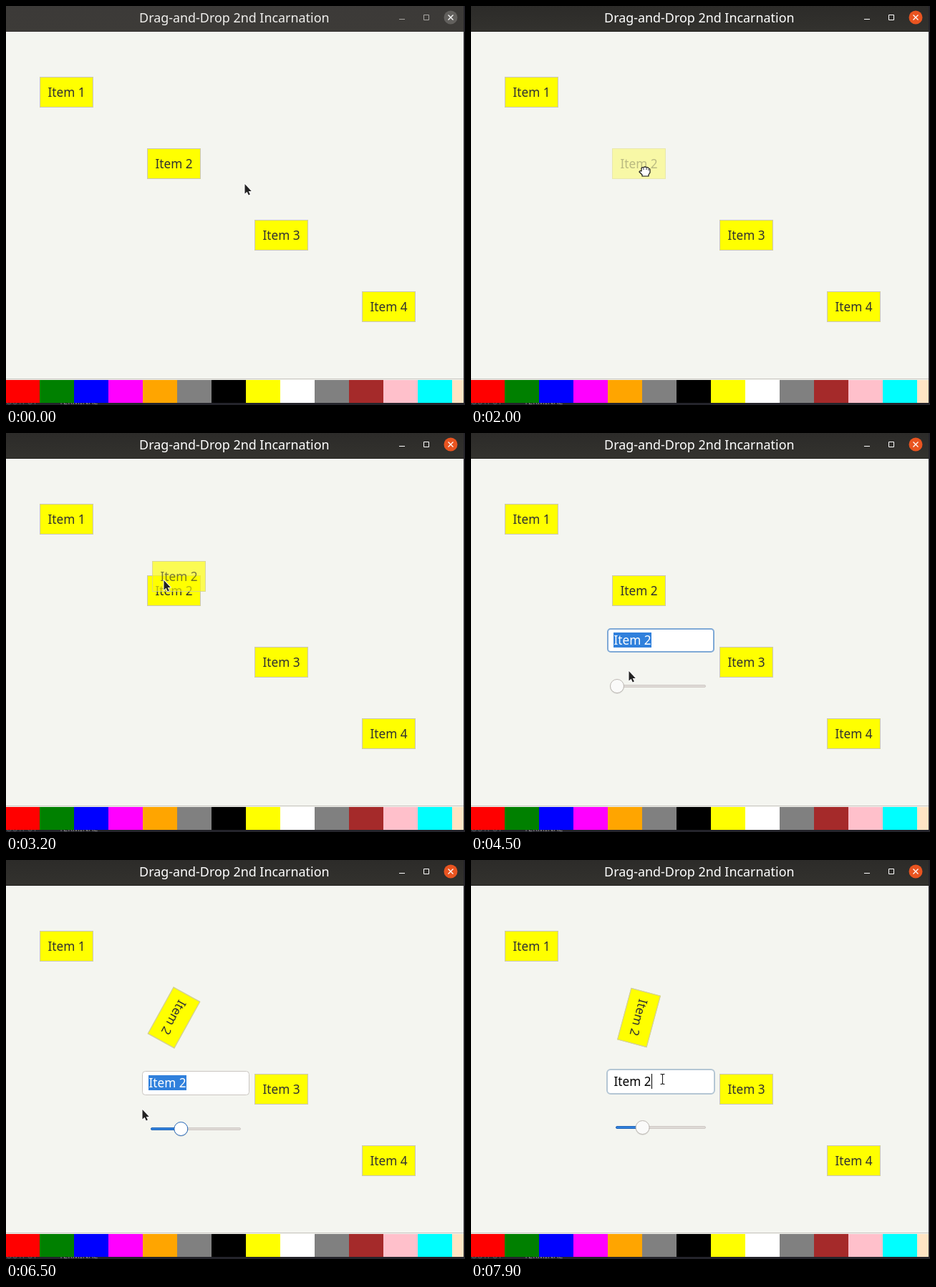
An HTML page with a canvas that plays this animation: 641x558 px, repeating every 8 s.

```html
<!DOCTYPE html>
<html lang="en">
<head>
<meta charset="utf-8">
<title>Drag and drop</title>
<style>
html, body { margin: 0; width: 641px; height: 558px; overflow: hidden; }
canvas { display: block; }
</style>
</head>
<body>
<canvas width="641" height="558"></canvas>
<script>
const g = document.querySelector('canvas').getContext('2d');
const FONT = '"Noto Sans", "Open Sans", sans-serif';
const LOOP = 8000, STEP = 100;
const ITEM_W = 75, ITEM_H = 43;
const HOME = { x: 197, y: 199 };
const SLIDER = { min: 203.7, length: 122, press: 5200, release: 7500 };
const GRAB = 2000, DROP = 3100, LANDED = 3700, EDIT = 4000, CLICK = 7900;
const BORDER = '#c8c4bc', BLUE = '#3080dc', DARK_BLUE = '#2467b8';
const SWATCHES = ['red', 'green', 'blue', 'magenta', 'orange', 'gray', 'black',
  'yellow', 'white', 'gray', 'brown', 'pink', 'cyan', 'bisque'];

// Turning points of the pointer: [time, x, y]
const PATH = [
  [200, 333, 248], [700, 288, 247], [1200, 262, 233], [1700, 240, 228], [GRAB, 240, 228],
  [2900, 232, 173], [3200, 220, 205], [4200, 226, 218], [4500, 220, 332], [5100, 205, 353],
  [5600, 248, 350], [5700, 249, 350], [5800, 332, 351], [6000, 203, 353], [6200, 172, 349],
  [6400, 172, 349], [6500, 190, 348], [6700, 298, 350], [6800, 280, 350], [7000, 280, 350],
  [7200, 346, 349], [7500, 239.3, 350], [7800, 267, 306]];

const mix = (a, b, u) => a + (b - a) * u;
const clamp = (v, lo, hi) => Math.min(hi, Math.max(lo, v));

function pointerAt(t) {
  const i = clamp(PATH.findIndex(p => p[0] > t), -1, PATH.length);
  if (i <= 0) return (i ? PATH[PATH.length - 1] : PATH[0]).slice(1);
  const [t0, x0, y0] = PATH[i - 1], [t1, x1, y1] = PATH[i];
  const u = (t - t0) / (t1 - t0);
  return [mix(x0, x1, u), mix(y0, y1, u)];
}

// The drawn pointer trails the slider it drags by one step
function angleAt(t) {
  if (t < SLIDER.press) return 0;
  const [x] = pointerAt(Math.min(t + STEP, SLIDER.release));
  return clamp((x - SLIDER.min) / SLIDER.length, 0, 1) * 360;
}

function rect(color, x, y, w, h) {
  g.fillStyle = color;
  g.fillRect(x, y, w, h);
}

function text(str, x, y, color, size = 17.2, align = 'left') {
  g.font = `${size}px ${FONT}`;
  g.textAlign = align;
  g.fillStyle = color;
  g.fillText(str, x, y);
}

function circle(x, y, r, fill, stroke) {
  g.beginPath();
  g.arc(x, y, r, 0, 7);
  g.fillStyle = fill;
  g.fill();
  if (stroke) { g.strokeStyle = stroke; g.stroke(); }
}

function box(x, y, w, h, r, fill, stroke) {
  g.beginPath();
  g.roundRect(x, y, w, h, r);
  g.fillStyle = fill;
  g.fill();
  g.strokeStyle = stroke;
  g.stroke();
}

function trace(path, color, width) {
  g.lineJoin = 'round';
  g.lineWidth = width;
  g.strokeStyle = color;
  g.stroke(path);
  g.lineWidth = 1;
}

function windowFrame(active) {
  rect('#f4f5f0', 0, 0, 641, 558);
  const bar = g.createLinearGradient(0, 0, 0, 35);
  bar.addColorStop(0, active ? '#2c2b29' : '#3c3a38');
  bar.addColorStop(1, active ? '#33322e' : '#3d3b38');
  rect(bar, 0, 0, 641, 35);
  rect(active ? '#1f1e1b' : '#343230', 0, 35, 641, 1);
  text('Drag-and-Drop 2nd Incarnation', 318.8, 23, active ? '#fff' : '#f0efed', 17.9, 'center');

  const ink = active ? '#fff' : '#a9a7a3';
  rect(ink, 549, 18, 8, 1);
  g.strokeStyle = ink;
  g.strokeRect(583.5, 12.5, 7, 7);
  circle(621, 16, 9.5, active ? '#e95420' : '#62605d');
  trace(new Path2D('M617.5 12.5l7 7m0-7l-7 7'), '#fff', 1.3);

  rect('#c9c6c1', 0, 521, 639, 1);
  SWATCHES.forEach((c, i) => rect(c, i * 48 - 1, 523, 48, 32));
  rect('#24242b', 0, 555, 641, 3);
  rect('#25242a', 639, 0, 2, 558);
  g.save();
  g.beginPath();
  g.rect(0, 555, 140, 3);
  g.clip();
  text('OUTPUT', 0, 556.5, '#606066', 11);
  text('TERMINAL', 74, 556.5, '#88888c', 11);
  g.restore();
}

function item(n, x, y, alpha = 1, angle = 0) {
  g.save();
  g.globalAlpha = alpha;
  g.translate(x + ITEM_W / 2, y + ITEM_H / 2);
  g.rotate(angle * Math.PI / 180);
  g.translate(-ITEM_W / 2, -ITEM_H / 2);
  rect('#ff0', 0, 0, ITEM_W, ITEM_H);
  g.strokeStyle = BORDER;
  g.strokeRect(0.5, 0.5, ITEM_W - 1, ITEM_H - 1);
  text('Item ' + n, 11.4, 28, '#2f3032');
  g.restore();
}

function movingItem(t, px, py) {
  if (t >= GRAB && t < DROP) {
    item(2, px - 43, py - 29, 0.31);
    return;
  }
  item(2, HOME.x, HOME.y, 1, angleAt(t));
  if (t >= DROP && t < LANDED) {
    const u = (t - DROP) / (LANDED - DROP);
    item(2, Math.round(mix(205.4, HOME.x, u)), Math.round(mix(175, HOME.y, u)), 0.78 * (1 - u));
  }
}

// Entry and slider hang below the rotated item's bounding box
function editor(t) {
  const angle = angleAt(t), a = angle * Math.PI / 180;
  const half = (ITEM_W * Math.abs(Math.sin(a)) + ITEM_H * Math.abs(Math.cos(a))) / 2;
  const top = Math.round(HOME.y + ITEM_H / 2 + half + 31);
  const clicked = t >= CLICK, focused = t < SLIDER.press;

  g.lineWidth = clicked || focused ? 2 : 1;
  if (clicked) box(190, top, 150, 34, 5, '#fff', '#b4c6d4');
  else if (focused) box(191, top + 1, 148, 32, 4, '#fff', '#7fa9d6');
  else box(190.5, top + 0.5, 149, 33, 4, '#fff', '#cac6c1');
  g.lineWidth = 1;
  if (clicked) rect('#000', 252, top + 6, 1, 21);
  else rect(BLUE, 199, top + 6, 53, 21);
  text('Item 2', 199.4, top + 23, clicked ? '#000' : '#fff');

  const knob = 204 + angle / 360 * SLIDER.length, y = top + 81;
  const pressed = t >= SLIDER.press && t <= SLIDER.release;
  box(202.5, y - 1.5, 125, 3, 2, '#dedad6', '#d0cac6');
  if (angle > 0) box(202.5, y - 1.5, knob - 202.5, 3, 2, BLUE, DARK_BLUE);
  circle(knob, y + 1, 10, 'rgba(0,0,0,.1)');
  circle(knob, y, 9.5, pressed ? '#fff' : '#fafaf9', pressed ? DARK_BLUE : '#bdb8b3');
}

const ARROW = new Path2D('M.5 1V14.5L3.6 11.7 5.8 16.5 7.9 15.6 5.7 10.9H9.8Z');
const FIST = new Path2D('M-4 0V-4Q-3-6-1-5Q1-7 3-5Q5-6 6-4Q8-4 8-2V2L6 5V7H-3V5L-7 1Q-7-1-4 0Z');
const KNUCKLES = new Path2D('M-1-4V-2M3-4V-2M6-3V-1');
const BEAM = new Path2D('M-3-7H-1L0-6 1-7H3M0-6V6M-3 7H-1L0 6 1 7H3');

function pointer(x, y, kind) {
  g.save();
  g.translate(x, y);
  if (kind === 'arrow') {
    trace(ARROW, '#fff', 1.8);
    g.fillStyle = '#222';
    g.fill(ARROW);
  } else if (kind === 'fist') {
    g.translate(2, 3);
    g.fillStyle = '#fff';
    g.fill(FIST);
    trace(FIST, '#111', 1.2);
    trace(KNUCKLES, '#222', 1);
  } else {
    g.translate(0.5, 0.5);
    trace(BEAM, '#fff', 2.6);
    trace(BEAM, '#222', 1.1);
  }
  g.restore();
}

function draw(t) {
  const [x, y] = pointerAt(t).map(Math.round);
  windowFrame(t >= GRAB);
  [1, 3, 4].forEach(n => item(n, 150 * n - 103, 100 * n - 1));
  movingItem(t, x, y);
  if (t >= EDIT) editor(t);
  pointer(x, y, t >= GRAB && t < DROP ? 'fist' : t >= 7700 ? 'beam' : 'arrow');
}

const start = performance.now();
function tick() {
  const t = (performance.now() - start) % LOOP;
  draw(Math.floor(t / STEP) * STEP);
  requestAnimationFrame(tick);
}
tick();
</script>
</body>
</html>
```
